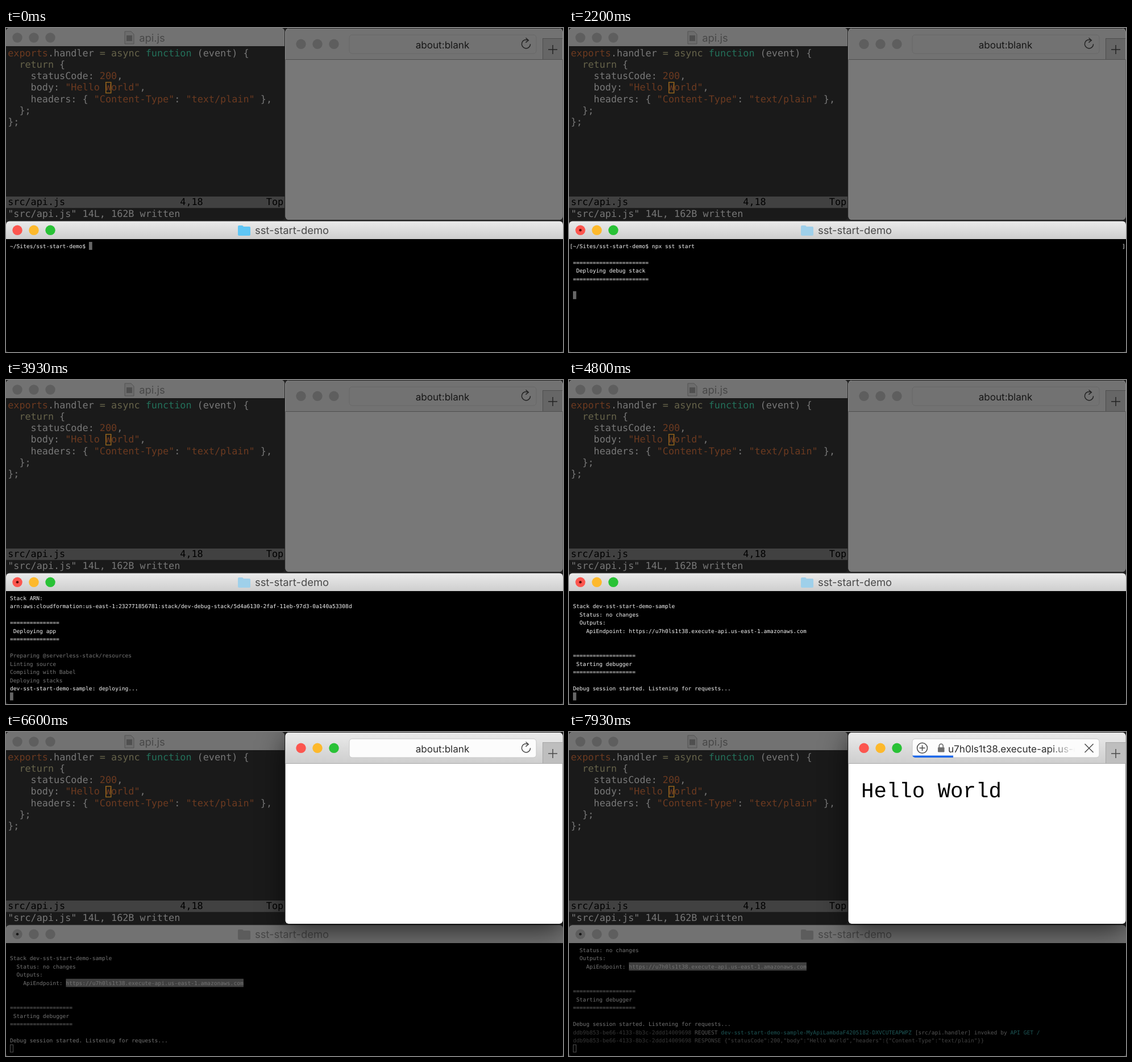
Recreate the animation shown at these times as an HTML page. Size 980 by 571 pixels, loop 8000 ms.

```html
<!DOCTYPE html>
<html lang="en">
<head>
<meta charset="utf-8">
<title>Terminal demo</title>
<style>
  html, body { margin: 0; width: 100%; height: 100%; overflow: hidden; background: #222; }
  svg { display: block; width: 980px; height: 571px; }
  text { white-space: pre; text-rendering: geometricPrecision; }
  .title { font: 18.4px Inter, sans-serif; fill: #4a4a4a; text-anchor: middle; }
  .url { font: 17.1px Inter, sans-serif; fill: #2e2e2e; }
  .mono { font-family: "DejaVu Sans Mono", monospace; }
  .icon { fill: none; stroke: #4a4a4a; stroke-width: 1.5; }
  .bar { fill: url(#chrome); }
  .dim { display: none; fill: #000; opacity: .53; }
  .dot { fill: #5e0c08; }
  .off .bar { fill: #f4f4f4; }
  .off .light { fill: #c9c9c9; }
  .off .title { fill: #989898; }
  .off .folder { fill: #c4c4c4; }
  .off .dot { fill: #333; }
  .off .dim { display: block; }
  .off .field { fill: #f4f4f4; stroke: #dcdcdc; }
  .off .tab { fill: #dadada; }
  .shade { filter: drop-shadow(0 12px 24px rgba(0, 0, 0, .65)); }
  .off .shade { filter: none; }
</style>
</head>
<body>
<svg viewBox="0 0 980 571">
  <defs>
    <linearGradient id="chrome" x2="0" y2="1">
      <stop stop-color="#ebebeb"/><stop offset="1" stop-color="#cecece"/>
    </linearGradient>
    <linearGradient id="fadeOut" gradientUnits="userSpaceOnUse" x1="845" x2="890" y1="0" y2="0">
      <stop stop-color="#fff"/><stop offset="1" stop-color="#000"/>
    </linearGradient>
    <mask id="fade" maskUnits="userSpaceOnUse" x="604" y="12" width="290" height="34">
      <rect x="604" y="12" width="290" height="34" fill="url(#fadeOut)"/>
    </mask>
    <clipPath id="fieldClip"><rect x="604" y="12" width="329" height="33" rx="5"/></clipPath>
    <clipPath id="editorClip"><rect width="490" height="339" rx="6"/></clipPath>
    <clipPath id="termClip"><rect y="340.5" width="980" height="231" rx="6"/></clipPath>
    <clipPath id="webClip"><rect x="491.5" y="1" width="488" height="337" rx="6"/></clipPath>
  </defs>

  <g id="editor" class="off" clip-path="url(#editorClip)">
    <rect width="490" height="339" fill="#1a1a1a"/>
    <rect class="bar" width="490" height="32"/>
    <g class="lights"></g>
    <path d="M209 6h11l5 5v17h-16z" fill="#e6e6e6" stroke="#b0b0b0"/>
    <rect x="212" y="13" width="10" height="10" fill="#a8a8a8"/>
    <text class="title" x="257" y="23.5">api.js</text>
    <rect class="dim" width="490" height="32"/>
    <rect y="297" width="490" height="20.2" fill="#414141"/>
    <g id="code" class="mono" font-size="16.8"></g>
    <rect x="175.7" y="95.7" width="9" height="18.8" fill="none" stroke="#94641c" stroke-width="1.5"/>
  </g>

  <g id="term" clip-path="url(#termClip)">
    <rect y="340" width="980" height="231"/>
    <rect class="bar" y="340" width="980" height="32"/>
    <g class="lights"></g>
    <circle class="dot" id="dot" cx="20" cy="356.3" r="2.3"/>
    <path class="folder" id="folder" d="M408 350q0-2 2-2h6l2 2h10q2 0 2 2v12q0 2-2 2h-18q-2 0-2-2z"/>
    <text class="title" x="503" y="363">sst-start-demo</text>
    <g id="screen" class="mono" font-size="9.614"></g>
    <rect class="dim" y="340" width="980" height="231"/>
  </g>

  <g id="web">
    <rect class="shade" x="491.5" y="1" width="488" height="337" rx="6" fill="#fff"/>
    <g clip-path="url(#webClip)">
      <rect class="bar" x="491" width="489" height="55"/>
      <g class="lights"></g>
      <rect class="tab" x="944.5" y="18.5" width="40" height="37" fill="#bebebe" stroke="#a6a6a6"/>
      <path class="icon" d="M954 38h16M962 30v16"/>
      <path d="M491 55.5h489" stroke="#a9a9a9"/>
      <rect class="field" x="604" y="12" width="329" height="33" rx="5" fill="#fcfcfc" stroke="#c6c6c6"/>
      <g id="blank">
        <text class="url" x="768" y="35.5" text-anchor="middle">about:blank</text>
        <path class="icon" d="M919 21.8a7.6 7.6 0 1 0 3.6 6.4M914.5 17.5l4.8 4.2-5 4"/>
      </g>
      <g id="loading">
        <circle class="icon" cx="621.5" cy="28.3" r="9"/>
        <path class="icon" d="M616.5 28.3h10M621.5 23.3v10M907.5 21l15 15M922.500 21l-15 15"/>
        <g mask="url(#fade)"><text class="url" id="address" y="35.5">u7h0ls1t38.execute-api.us-east-1</text></g>
        <g id="lock">
          <rect x="649" y="27" width="11.5" height="8.500" rx="1.2" fill="#707070"/>
          <path d="M651.300 27v-2.500a3.450 3.450 0 0 1 6.900 0v2.500" fill="none" stroke="#707070" stroke-width="1.700"/>
        </g>
        <g clip-path="url(#fieldClip)"><rect id="progress" x="604" y="41.500" height="4" fill="#1a66ea"/></g>
      </g>
      <text id="page" x="514" y="115" font-family="Liberation Mono, monospace" font-size="37.400">Hello World</text>
      <rect class="dim" x="491" width="489" height="339"/>
    </g>
  </g>
</svg>
<script>
const $ = id => document.getElementById(id);
const show = (id, on) => $(id).style.display = on ? '' : 'none';
const count = (times, t) => times.filter(x => x <= t).length;

// runs: text, colour, text, colour, ...
function line(x, y, runs) {
  let spans = '';
  for (let i = 0; i < runs.length; i += 2)
    spans += `<tspan fill="${runs[i + 1] || '#f4f4f4'}">${runs[i]}</tspan>`;
  return `<text x="${x}" y="${y}">${spans}</text>`;
}

[['editor', 20, 17], ['term', 20, 356.3], ['web', 519, 28.3]].forEach(([id, x, y]) => {
  document.querySelector(`#${id} .lights`).innerHTML = ['#fc564f', '#fdb92c', '#29c236']
    .map((c, i) => `<circle class="light" cx="${x + i * 29}" cy="${y}" r="8.7" fill="${c}"/>`).join('');
});

const plain = '#777', warm = '#6c3a20', olive = '#66634a', green = '#23705a';
$('code').innerHTML = [
  ['exports', warm, '.handler ', plain, '= async ', olive, 'function', green, ' (event) {', plain],
  ['  return', olive, ' {', plain],
  ['    statusCode: ', plain, '200', warm, ',', plain],
  ['    body: ', plain, '"Hello World"', warm, ',', plain],
  ['    headers: { ', plain, '"Content-Type"', warm, ': ', plain, '"text/plain"', warm, ' },', plain],
  ['  };', plain],
  ['};', plain],
  [], [], [], [], [], [],
  ['src/api.js' + ' '.repeat(20) + '4,18' + ' '.repeat(11) + 'Top', '#000'],
  ['"src/api.js" 14L, 162B written', plain]
].map((runs, i) => line(3.2, 49.8 + i * 20.2, runs)).join('');

const CHAR = 5.788, ROW = 14.47, LEFT = 7, TOP = 377, ROWS = 13;
const command = 'npx sst start', prompt = '~/Sites/sst-start-demo$ ';
const keys = [130, 270, 400, 530, 670, 730, 870, 960, 1070, 1150, 1240, 1330, 1530];
const grey = '#767676', teal = '#3fb8b8', soft = '#b4b4b4';
const link = 'https://u7h0ls1t38.execute-api.us-east-1.amazonaws.com';
const linkIndent = '    ApiEndpoint: ';
const requestId = 'ddb9b853-be66-4133-8b3c-2ddd14009698 ';

const log = [];
const print = (time, ...lines) =>
  lines.forEach(l => log.push({ time, runs: Array.isArray(l) ? l : [l, ''] }));
const banner = s => ['='.repeat(s.length + 2), ' ' + s, '='.repeat(s.length + 2), ''];

print(1670, prompt + command);
print(2200, '', ...banner('Deploying debug stack'));
print(2530, 'dev-debug-stack: deploying...');
print(2670, '', [' ✔  dev-debug-stack (no changes)', '#3fc04f'], '', 'Stack ARN:',
  'arn:aws:cloudformation:us-east-1:232771856781:stack/dev-debug-stack/5d4a6130-2faf-11eb-97d3-0a140a53308d',
  '', ...banner('Deploying app'));
print(3200, ['Preparing @serverless-stack/resources', grey]);
print(3400, ['Linting source', grey]);
print(3930, ['Compiling with Babel', grey], ['Deploying stacks', grey],
  'dev-sst-start-demo-sample: deploying...');
print(4000, '');
print(4070, [' ✔  dev-sst-start-demo-sample (no changes)', '#3fc04f'], '',
  'Stack dev-sst-start-demo-sample', '  Status: no changes', '  Outputs:');
const linkLine = log.length;
print(4070, linkIndent + link, '', '', ...banner('Starting debugger'),
  'Debug session started. Listening for requests...');
print(7730, [requestId, grey, 'REQUEST ', soft,
  'dev-sst-start-demo-sample-MyApiLambdaF4205182-DXVCUTEAPWPZ', teal,
  ' [src/api.handler] invoked by ', soft, 'API GET /', teal]);
print(7800, [requestId, grey,
  'RESPONSE {"statusCode":200,"body":"Hello World","headers":{"Content-Type":"text/plain"}}', '#8c8c8c']);

function screen(t, active) {
  const lines = log.filter(l => l.time <= t);
  const typing = !lines.length;
  const typed = prompt + command.slice(0, count(keys, t));
  const first = Math.max(0, lines.length + 1 - ROWS);
  const rowY = i => TOP + (i - first) * ROW;
  let out = '';

  const sweep = Math.min(1, Math.max(0, (t - 5070) / 460));
  const selected = Math.round(sweep * link.length);
  if (selected)
    out += `<rect x="${LEFT + linkIndent.length * CHAR}" y="${rowY(linkLine)}" width="${selected * CHAR}" height="${ROW}" fill="${active ? '#555' : '#888'}"/>`;

  const cx = LEFT + (typing ? typed.length * CHAR : 0), cy = rowY(lines.length);
  out += active
    ? `<rect x="${cx}" y="${cy}" width="${CHAR}" height="14" fill="#666"/>`
    : `<rect x="${cx + .5}" y="${cy + .5}" width="5" height="13" fill="none" stroke="#aaa"/>`;

  if (typing) return out + line(LEFT, TOP + 10.8, [typed, '']);
  lines.forEach((l, i) => { if (i >= first) out += line(LEFT, rowY(i) + 10.8, l.runs); });
  if (!first)
    out += line(LEFT - CHAR, TOP + 10.8, ['[', '']) + line(973, TOP + 10.8, [']', '']);
  return out;
}

let last = '';
function frame(now) {
  const t = now % 8000, browsing = t >= 6600, running = t >= 1730;
  $('term').classList.toggle('off', browsing);
  $('web').classList.toggle('off', !browsing);
  const html = screen(t, !browsing);
  if (html !== last) $('screen').innerHTML = last = html;

  show('dot', running);
  $('folder').setAttribute('fill', running ? '#9fd0ea' : '#5fc6f5');

  const loading = t >= 7470, secure = t >= 7870;
  show('blank', !loading);
  show('loading', loading);
  show('lock', secure);
  show('page', t >= 7930);
  $('address').setAttribute('x', secure ? 667 : 653);
  $('progress').setAttribute('width', [0, 20, 38, 55, 72][count([7470, 7530, 7870, 7930], t)]);
  requestAnimationFrame(frame);
}
requestAnimationFrame(frame);
</script>
</body>
</html>
```
